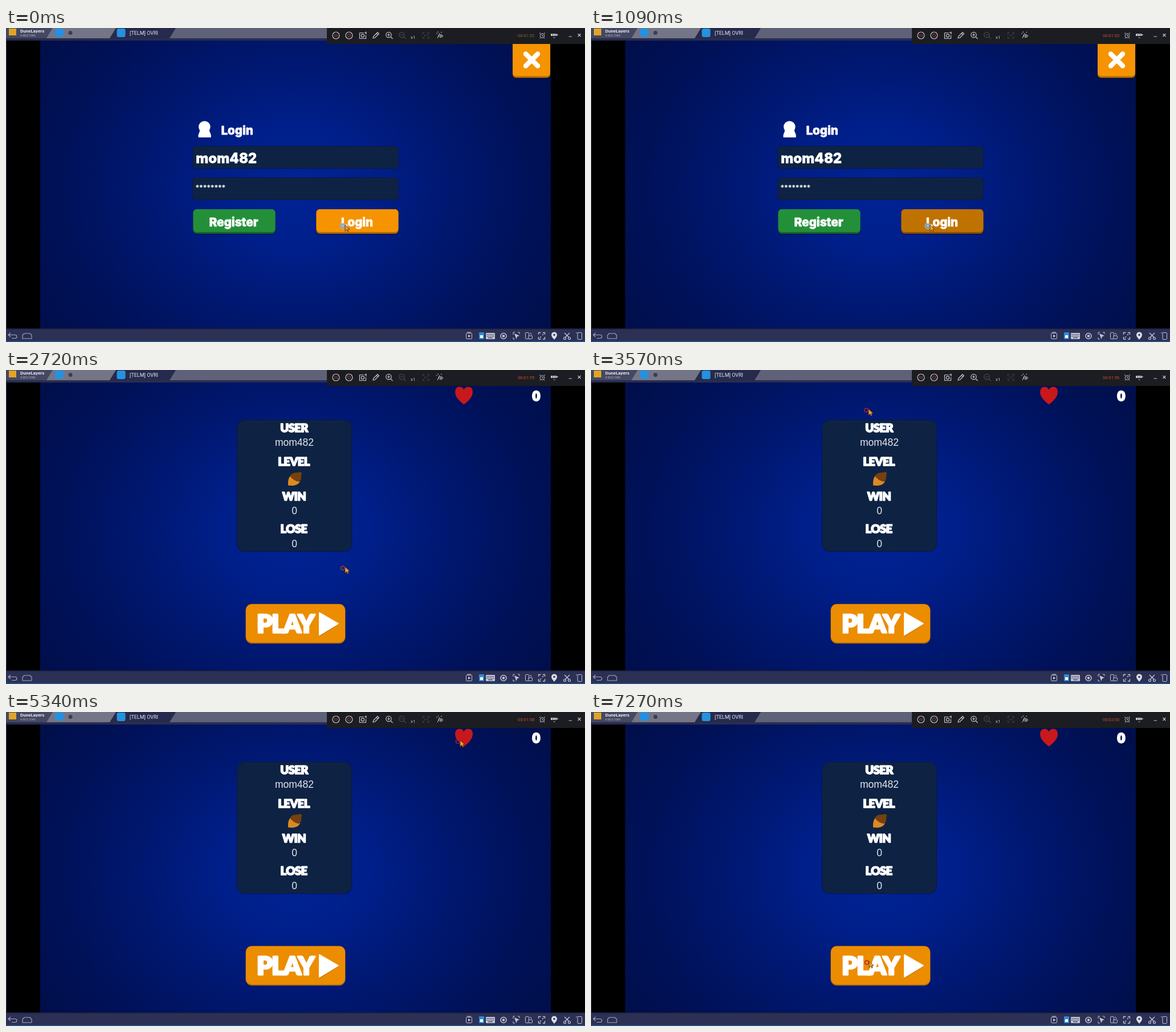
Recreate the animation shown at these times as an HTML page with a canvas. Size 1016x551 px, loop 8000 ms.

```html
<!DOCTYPE html>
<html lang="en">
<head>
<meta charset="utf-8">
<title>Login and play</title>
<style>
html, body { margin: 0; width: 100%; height: 100%; overflow: hidden; background: #000; }
canvas { display: block; width: 1016px; height: 551px; }
</style>
</head>
<body>
<canvas id="stage" width="1016" height="551"></canvas>
<script>
const ctx = document.getElementById('stage').getContext('2d');
const LOOP = 8000, PRESS = 690, SWITCH = 1950;
const USER = 'mom482';
const ORANGE = '#f69300', NAVY = '#0e2344';

// Cursor stops: time, x, y
const PATH = [
  [2720, 591, 348], [3570, 483, 71], [4720, 788, 58],
  [5410, 793, 52], [5960, 679, 385], [6500, 484, 440]
];

function rect(x, y, w, h, color) {
  ctx.fillStyle = color;
  ctx.fillRect(x, y, w, h);
}

function box(x, y, w, h, r, fill, stroke, lw = 1) {
  ctx.beginPath();
  ctx.roundRect(x, y, w, h, r);
  if (fill) { ctx.fillStyle = fill; ctx.fill(); }
  if (stroke) { ctx.strokeStyle = stroke; ctx.lineWidth = lw; ctx.stroke(); }
}

function poly(points, fill) {
  ctx.beginPath();
  points.forEach(([x, y], i) => i ? ctx.lineTo(x, y) : ctx.moveTo(x, y));
  ctx.closePath();
  ctx.fillStyle = fill;
  ctx.fill();
}

function lines(d, color, lw = 1.2) {
  ctx.strokeStyle = color;
  ctx.lineWidth = lw;
  ctx.stroke(new Path2D(d));
}

function shape(d, fill) {
  ctx.fillStyle = fill;
  ctx.fill(new Path2D(d));
}

function disc(x, y, r, fill, stroke, lw = 1.2) {
  ctx.beginPath();
  ctx.arc(x, y, r, 0, Math.PI * 2);
  if (fill) { ctx.fillStyle = fill; ctx.fill(); }
  if (stroke) { ctx.strokeStyle = stroke; ctx.lineWidth = lw; ctx.stroke(); }
}

function text(s, x, y, font, color, align = 'left', fat = 0, spacing = 0) {
  ctx.font = font;
  ctx.textAlign = align;
  ctx.letterSpacing = spacing + 'px';
  ctx.fillStyle = color;
  ctx.fillText(s, x, y);
  if (fat) {
    ctx.strokeStyle = color;
    ctx.lineWidth = fat;
    ctx.strokeText(s, x, y);
  }
  ctx.letterSpacing = '0px';
}

const round = (s, x, y, size, align) =>
  text(s, x, y, `800 ${size}px Inter, sans-serif`, '#fff', align, 0.8);
const heavy = (s, x, y, size, spacing, fat) =>
  text(s, x, y, `900 ${size}px Lato, sans-serif`, '#fff', 'center', fat, spacing);

function backdrop() {
  rect(0, 0, 1016, 551, '#000');
  ctx.save();
  ctx.beginPath();
  ctx.rect(60, 22, 896, 505);
  ctx.clip();
  ctx.translate(508, 280);
  ctx.scale(1, 0.84);
  const g = ctx.createRadialGradient(0, 0, 0, 0, 0, 520);
  g.addColorStop(0, '#002396');
  g.addColorStop(0.25, '#001f8a');
  g.addColorStop(0.5, '#001872');
  g.addColorStop(0.8, '#001158');
  g.addColorStop(1, '#000f4c');
  ctx.fillStyle = g;
  ctx.fillRect(-460, -360, 920, 720);
  ctx.restore();
}

function tabBar() {
  rect(0, 0, 563, 22, '#292d4f');
  rect(0, 0, 563, 18, '#5f6178');
  poly([[0, 0], [82, 0], [71, 18], [0, 18]], '#454862');
  poly([[82, 0], [193, 0], [182, 18], [71, 18]], '#747586');
  poly([[193, 0], [298, 0], [287, 18], [182, 18]], '#262a4c');
  rect(5, 1, 13, 12, '#e0a526');
  text('DuneLayers', 25, 8, 'bold 8px Roboto, sans-serif', '#e8e8ef');
  text('4.90.0.1046', 25, 15, '5px Roboto, sans-serif', '#b9bac8');
  box(86, 1, 15, 14, 3, '#2492e0');
  disc(113, 8.5, 3.5, '#3b3d50');
  box(194.5, 1, 15, 15, 3, '#2492e0');
  text('[TELM] OVRI', 217, 12, '9px Roboto, sans-serif', '#e4e5ee');
}

function recorder(t) {
  const c = '#c4c5c9', dim = '#4a4b50', red = '#a8463a';
  rect(563, 0, 453, 28, '#1b1d22');
  disc(579, 13, 6, null, c);
  lines('M577.3 10.5v5M580.7 10.5v5', red);
  disc(602, 13, 6, null, c);
  box(599.7, 10.7, 4.6, 4.6, 1, null, red);
  lines('M620.5 8.5h7M620.5 8.5v10h11v-6M629 9l3-2v4', c);
  disc(626, 13.5, 2.6, null, c);
  lines('M644 18l1-3.5 7-7 2.5 2.5-7 7zM650 9.5l2.5 2.5', c);
  disc(671.5, 12, 4.7, null, c);
  lines('M675 15.5l3.5 3.5M669 12h5M671.5 9.5v5', c);
  disc(694.5, 12, 4.7, null, dim);
  lines('M698 15.5l3.5 3.5M692 12h5', dim);
  text('x1', 710, 19, '8px Roboto, sans-serif', c);
  lines('M731.5 11v-3h3M739 8h3v3M731.5 15v3h3M739 18h3v-3M735 11v4M739 11v4', dim, 1);
  lines('M757 18l4-9M755 9l2 1M758 6l.5 2M763 8l2-1', c, 1);
  lines('M759 14q4-5 8 0-4 5-8 0', c, 1);
  disc(763.2, 14, 1.3, c);

  const sec = 112 + Math.floor((t + 730) / 1000);
  const clock = `00:0${Math.floor(sec / 60)}:${String(sec % 60).padStart(2, '0')}`;
  text(clock, 898, 16, '7.6px Roboto, sans-serif', t < 230 ? '#96652c' : '#d04a32');

  disc(941, 13.5, 3.8, null, c, 1);
  lines('M941 11.5v2.5h2M936 10l2-2M946 10l-2-2M938 17l-1 1.5M944 17l1 1.5', c, 1);
  box(956, 10, 10.5, 4, 0.5, c);
  rect(967, 11, 1.5, 2, c);
  rect(959, 10.5, 0.8, 3, '#1b1d22');
  rect(963, 10.5, 0.8, 3, '#1b1d22');
  lines('M960.5 16.5l1.5 1.2 1.5-1.2', c, 0.9);
  lines('M987.5 15h5.5M1003.5 10l5 5M1008.5 10l-5 5', c, 1.2);
}

function bottomBar() {
  const c = '#c3c5d3';
  rect(0, 527, 1016, 24, '#2c3055');
  rect(0, 527, 1016, 1.5, '#191c38');
  rect(0, 549.5, 1016, 1.5, '#24558b');
  rect(0, 22, 1, 529, '#30344f');
  lines('M8 535l-4 3.5 4 3.5M4 538.5h12q3 0 3 3t-3 3h-6', '#a7a9bc', 1.1);
  lines('M29 545v-6l3-3h10l3 3v6z', '#a7a9bc', 1.1);

  box(807.5, 535.5, 10, 10, 1, null, c);
  poly([[811, 538], [815.5, 540.5], [811, 543]], c);
  lines('M809 534h7', c, 1);
  box(830, 534, 9, 12, 1, '#2c8bd8');
  box(832, 539, 5, 5, 0.5, '#fff');
  box(842, 535, 16, 11, 1, c);
  for (let i = 0; i < 10; i++) rect(843.5 + (i % 5) * 2.8, 537 + Math.floor(i / 5) * 3, 1.5, 1.5, '#2c3055');
  rect(846, 543, 8, 1.2, '#2c3055');
  disc(873, 540.5, 5, null, c, 1.5);
  disc(873, 540.5, 2.3, c);
  lines('M890 538v-4h3M898 534h3v3M890 543v3h3', c, 1);
  poly([[892, 536], [901, 540], [897, 541.5], [895.5, 546]], c);
  box(911.5, 534.5, 6, 11, 1, null, c);
  box(917, 540, 6.5, 5.5, 1, '#2c3055', c);
  lines('M919 535.5q3 0 3 3', c, 1);
  lines('M934.5 538v-3.5h4M942 534.5h3.5v3.5M934.5 542v4h4M942 546h3.5v-4M937 543.5l2-2M943 537l-2 2', c, 1.3);
  shape('M962 547q-5-5.5-5-8.5a5 5 0 0 1 10 0q0 3-5 8.5z', '#dcdde6');
  disc(962, 538.5, 1.7, '#2c3055');
  lines('M980 535l8 8M989 535l-8 8', c, 1.4);
  disc(980.5, 544.5, 2, null, c, 1.2);
  disc(988.5, 544.5, 2, null, c, 1.2);
  box(1003, 534.5, 7.5, 12, 1, null, c);
  lines('M1001 536v-2', c, 1);
}

function button(x, y, w, h, fill, edge) {
  box(x - 0.5, y, w + 1, h + 2, 7, 'rgba(0,10,50,.45)');
  box(x, y, w, h, 6, edge);
  box(x, y, w, h - 3, 6, fill);
}

function loginPage(pressed) {
  button(889, 20, 66, 67.5, ORANGE, '#b66b00');
  ctx.lineCap = 'round';
  lines('M912 45.5l21 21M933 45.5l-21 21', '#fff', 8.5);
  ctx.lineCap = 'butt';

  disc(348.3, 173.5, 10.3, '#fff');
  shape('M340 178h16.6q.4 4 2 6.500t1 7.500h-22q-.6-5 1-7.500t1.400-6.500z', '#fff');
  round('Login', 377.5, 187, 20.5);

  for (const y of [207.5, 262.5]) box(327.5, y, 361, 39, 6, NAVY, '#0a184c', 1.2);
  round(USER, 333, 237, 24);
  text('********', 332.5, 285.5, '900 15.5px Lato, sans-serif', '#fff');

  button(328.5, 318, 144, 43, '#239039', '#17642a');
  round('Register', 399.5, 347.5, 20.8, 'center');
  if (pressed) button(544.5, 318, 144, 43, '#c07200', '#875000');
  else button(544.5, 318, 144, 43, ORANGE, '#b46a00');
  round('Login', 616, 347.5, 20.5, 'center');
}

function acorn() {
  shape('M495 202.500q-1-11 4-17l17 10q-4 7-13 7.500z', '#dc8a22');
  shape('M498 186q4-6.500 12-6l7-1 2 2-1 5q1 7-4 10-9-1-16-10z', '#76400f');
}

function playPage() {
  shape('M803.5 60.5q-15-11-15.5-21 0-10 8-10 5 0 7.500 5 2.500-5 8-5 8 .5 7.500 10-.5 10-15.500 21z', '#c8181c');
  heavy('0', 930.5, 53.5, 23, 0, 2.4);

  box(405.5, 87.5, 201, 231, 14, NAVY, '#0a184c', 1.5);
  heavy('USER', 505.5, 108.8, 20, -0.5, 1.7);
  heavy('LEVEL', 505, 167.5, 20, -0.5, 1.7);
  heavy('WIN', 505.5, 228.5, 20, -0.5, 1.7);
  heavy('LOSE', 505, 286, 20, -0.5, 1.7);
  const plain = '17.5px "Liberation Sans", Arial, sans-serif';
  text(USER, 506, 133, plain, '#e3e6ee', 'center');
  text('0', 506, 252.5, plain, '#e3e6ee', 'center');
  text('0', 506, 310.5, plain, '#e3e6ee', 'center');
  acorn();

  box(420.5, 410.5, 175, 69.5, 11, '#b86d00');
  box(421, 411, 174, 67, 10.5, '#ec8d00');
  heavy('PLAY', 490, 461, 43.5, -1.8, 3);
  poly([[550, 428], [585, 446], [550, 468]], '#c77a0a');
  poly([[550, 426], [583, 445], [550, 465]], '#fff');
  lines('M550 426L583 445 550 465z', '#fff', 2);
}

function cursorAt(t) {
  if (t <= PATH[0][0]) return PATH[0].slice(1);
  for (let i = 1; i < PATH.length; i++) {
    const [t0, x0, y0] = PATH[i - 1], [t1, x1, y1] = PATH[i];
    if (t < t1) {
      const u = (t - t0) / (t1 - t0), e = u * u * (3 - 2 * u);
      return [x0 + (x1 - x0) * e, y0 + (y1 - y0) * e];
    }
  }
  return PATH[PATH.length - 1].slice(1);
}

function cursor(t) {
  const [x, y] = cursorAt(t);
  if (t < SWITCH) {
    disc(x, y - 0.5, 5.5, 'rgba(165,180,190,.85)');
    disc(x, y - 0.5, 3, null, t < PRESS ? '#8397a5' : '#4d91a6', 1.2);
  } else {
    disc(x, y - 0.5, 3.3, null, t < 3000 ? '#8d4a20' : '#a5232b', 1.5);
  }
  ctx.save();
  ctx.translate(x + 4, y - 2.5);
  const arrow = 'M0 0L0 11 2.8 8.5 4.5 12 6.3 11 4.8 7.8 8 7.5z';
  shape(arrow, t < PRESS ? '#e59a36' : '#f0a02c');
  lines(arrow, '#4b2b12', 0.8);
  ctx.restore();
}

function draw(t) {
  ctx.lineJoin = 'round';
  backdrop();
  if (t < SWITCH) loginPage(t >= PRESS);
  else playPage();
  tabBar();
  recorder(t);
  bottomBar();
  cursor(t);
}

const start = performance.now();
function tick() {
  draw((performance.now() - start) % LOOP);
  requestAnimationFrame(tick);
}
tick();
</script>
</body>
</html>
```
